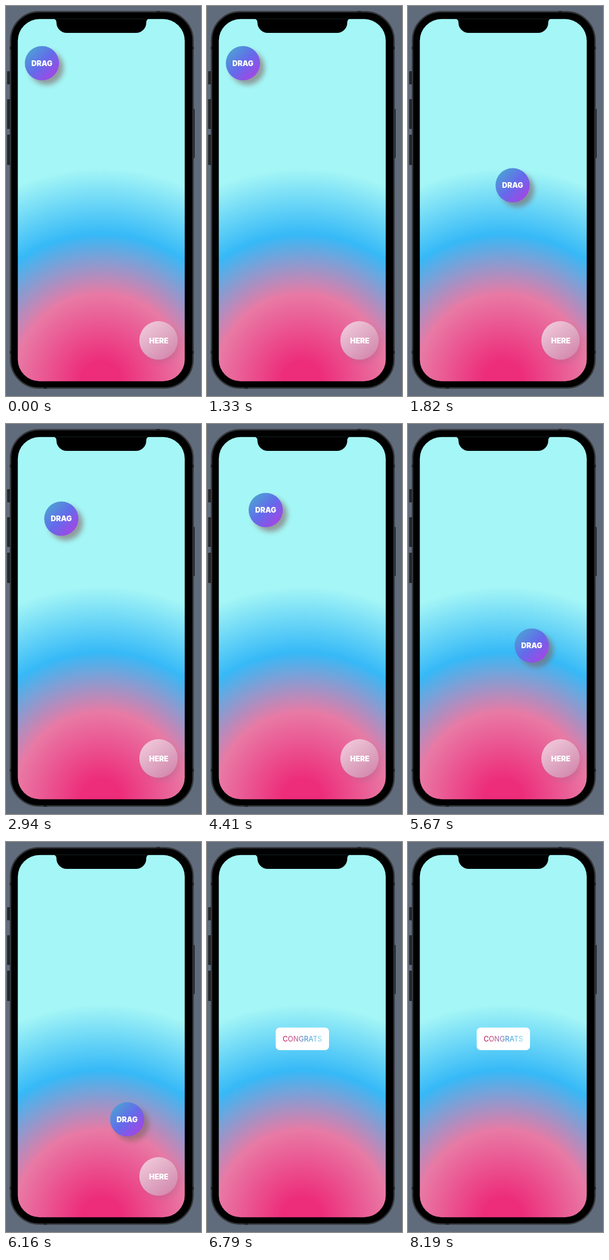
An HTML page that plays this animation: 342x682 px, repeating every 8260 ms.

```html
<!DOCTYPE html>
<html lang="en">
<head>
<meta charset="utf-8">
<title>Drag and drop</title>
<style>
  html, body { margin: 0; width: 100%; height: 100%; overflow: hidden; background: #606c7b; }
  svg { display: block; width: 342px; height: 682px; }
  text { font-family: Inter, sans-serif; text-anchor: middle; }
  .label { font-size: 12.8px; font-weight: 900; fill: #fff; }
  .congrats { font-size: 12.4px; font-weight: 500; fill: url(#lettering); }
</style>
</head>
<body>
<svg viewBox="0 0 342 682">
  <defs>
    <radialGradient id="glow" gradientUnits="userSpaceOnUse" cx="167" cy="656" r="372">
      <stop offset=".09" stop-color="#ed2c7a"/>
      <stop offset=".41" stop-color="#e87aa5"/>
      <stop offset=".69" stop-color="#36b9f7"/>
      <stop offset="1" stop-color="#a5f6f6"/>
    </radialGradient>
    <linearGradient id="ballFill" x1=".15" y1=".15" x2=".85" y2=".85">
      <stop offset="0" stop-color="#4f9bd6"/>
      <stop offset=".5" stop-color="#636bea"/>
      <stop offset="1" stop-color="#9f48e6"/>
    </linearGradient>
    <linearGradient id="goalFill" x1=".2" y1=".1" x2=".8" y2=".9">
      <stop offset="0" stop-color="#efc4d8"/>
      <stop offset=".5" stop-color="#dfa9c3"/>
      <stop offset="1" stop-color="#d58bb0"/>
    </linearGradient>
    <linearGradient id="lettering">
      <stop offset="0" stop-color="#bd2460"/>
      <stop offset=".3" stop-color="#cf6c9d"/>
      <stop offset=".6" stop-color="#4b9ad6"/>
      <stop offset="1" stop-color="#98e2f2"/>
    </linearGradient>
    <filter id="soft" x="-50%" y="-50%" width="200%" height="200%">
      <feGaussianBlur stdDeviation="4.5"/>
    </filter>
    <clipPath id="screen"><rect x="20.7" y="22.8" width="292.8" height="633.4" rx="38"/></clipPath>
  </defs>

  <rect width="342" height="682" fill="#606c7b"/>
  <g fill="#25272a">
    <rect x="2" y="114" width="6" height="23" rx="1"/>
    <rect x="2" y="163" width="6" height="52" rx="1"/>
    <rect x="2" y="225" width="6" height="53" rx="1"/>
    <rect x="327" y="180" width="4" height="86" rx="1"/>
  </g>
  <rect x="8" y="10" width="320" height="658" rx="50" fill="#000" stroke="#34363a" stroke-width="2.5"/>
  <path d="M8 71v5M328 71v5M8 603v5M328 603v5M264 10h6M66 668h6" stroke="#1c1d1f" stroke-width="2.5"/>

  <g clip-path="url(#screen)">
    <rect x="20" y="22" width="294" height="635" fill="url(#glow)"/>
    <g id="game">
      <circle cx="273" cy="591" r="33" fill="#a06484" opacity=".3" filter="url(#soft)"/>
      <circle cx="267.5" cy="584.8" r="33.7" fill="url(#goalFill)"/>
      <text class="label" x="268" y="589.5">HERE</text>
      <g id="ball">
        <circle cx="8" cy="8" r="30" fill="#806464" opacity=".6" filter="url(#soft)"/>
        <circle r="30" fill="url(#ballFill)"/>
        <text class="label" y="4.8">DRAG</text>
      </g>
    </g>
    <g id="card">
      <rect x="120.5" y="324.5" width="93.5" height="39.5" rx="7" fill="#fff"/>
      <text class="congrats" x="167.3" y="349">CONGRATS</text>
    </g>
  </g>
  <path d="M83 22.5Q88.5 23 88.5 29A18 18 0 0 0 106.500 47H228A18 18 0 0 0 246 29Q246 23 251 22.5Z" fill="#000"/>
</svg>
<script>
  const LOOP = 8260, STEP = 70, DROP = 6790;
  // Each key is [time, x, y]; the ball rests between the two drags.
  const firstDrag = [[1330, 63, 100], [1820, 183.5, 313.5], [2170, 238, 410], [2940, 97, 165.5], [3080, 103, 150.5]];
  const secondDrag = [[4410, 103, 150.5], [5110, 215.5, 276], [6160, 212.5, 485], [6720, 268, 585]];
  const byId = id => document.getElementById(id);
  const ball = byId("ball"), game = byId("game"), card = byId("card");

  function slope(keys, i, axis) {
    const before = keys[i - 1], after = keys[i + 1];
    return before && after ? (after[axis] - before[axis]) / (after[0] - before[0]) : 0;
  }

  // Cubic Hermite path, at rest at both ends.
  function along(keys, time) {
    const last = keys.length - 1;
    const t = Math.min(Math.max(time, keys[0][0]), keys[last][0]);
    let i = 0;
    while (i < last - 1 && t > keys[i + 1][0]) i++;
    const a = keys[i], b = keys[i + 1], span = b[0] - a[0];
    const u = (t - a[0]) / span, v = 1 - u;
    return [1, 2].map(axis =>
      v * v * (1 + 2 * u) * a[axis] + u * u * (3 - 2 * u) * b[axis] +
      u * v * span * (v * slope(keys, i, axis) - u * slope(keys, i + 1, axis)));
  }

  function draw(now) {
    const time = Math.floor((now % LOOP) / STEP) * STEP;
    const [x, y] = along(time < secondDrag[0][0] ? firstDrag : secondDrag, time);
    ball.setAttribute("transform", `translate(${x} ${y})`);
    const dropped = time >= DROP;
    game.style.display = dropped ? "none" : "";
    card.style.display = dropped ? "" : "none";
  }

  const start = performance.now();
  function tick() {
    draw(performance.now() - start);
    requestAnimationFrame(tick);
  }
  tick();
</script>
</body>
</html>
```
